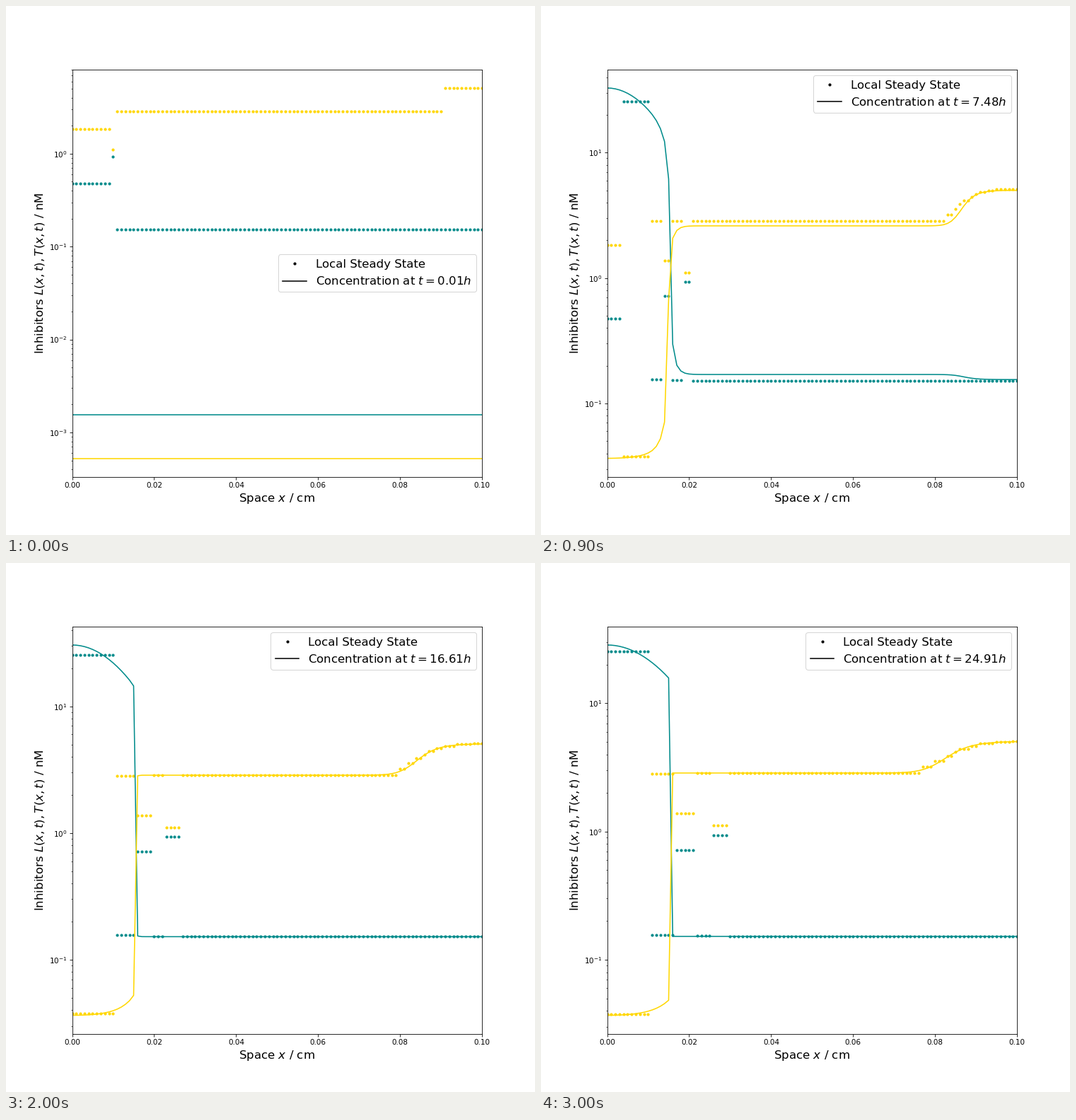
These frames come from a looping animation (748x748 px, 3.1 s). A matplotlib script:

```python
import numpy as np
import matplotlib.pyplot as plt
from matplotlib.animation import FuncAnimation
from matplotlib.lines import Line2D

FRAMES, INTERVAL = 31, 100
HOURS = .83
TEAL, GOLD = "darkcyan", "gold"
CELL = np.arange(101)
SPACE = CELL / 1000

L_START, T_START = .00154, .000527
T_MID, T_RIGHT = 2.86, 5.09

# Local steady states of the zones on the left, in order of space.
L_ZONES = np.array([.474, 25.5, .156, .715, .153, .935, .152])
T_ZONES = np.array([1.83, .0377, 2.84, 1.38, 2.85, 1.11, T_MID])
ZONE_SPEED = np.array([1.45, 2.32, 3.13, 4.06])


def settle(rate, power, t):
    """Growth from 0 towards 1."""
    return 1 - np.exp(-rate * t ** power)


def pulse(height, decay, t):
    """Temporary excess that rises and dies away."""
    return height * t * t * np.exp(-decay * t)


def front_z(t):
    """Diffusion variable of the front on the right."""
    return (90.5 - CELL) / np.sqrt(t)


def front_rise(t):
    """Share of the right-hand level reached in each cell."""
    z = np.clip(front_z(max(.6 * t, t - 1.6)), -3, 20)
    return 1 / (1 + np.exp(-1.815 + 1.15 * z + .131 * z * z))


def blend(inner, outer, gap, rate, t):
    """Join both sides on a log scale with a front that sharpens in time."""
    centre = 15.5 - gap * np.exp(-rate * max(0, t - 4.16))
    d = CELL - centre
    steepness = max(0, .6 * (t - 4.8))
    w = 1 / (1 + np.exp(-d - steepness * np.tanh(2 * d)))
    return inner ** (1 - w) * outer ** w


def concentrations(t):
    age = t - .01
    rise = front_rise(t)
    x = np.minimum(CELL, 16) / 10
    l_full = 34.8 * np.exp(-.008 * t - (.45 - .0075 * t) * x ** 2)
    l_in = L_START + l_full * settle(.0765, 2.5, age)
    l_out = (L_START + .1505 * settle(1, 2, age)
             + pulse(1.15, 1.094, age) * (1 - .85 * rise))
    t_in = (T_START + (.034 + 54 / l_full ** 3) * settle(1, 2, age)
            + pulse(.135, 1.3, age))
    t_out = (T_START + T_MID * settle(.0718, 1.75, age) * (1 - rise)
             + T_RIGHT * settle(.211, 1.53, age) * rise)
    return blend(l_in, l_out, 1.25, .83, t), blend(t_in, t_out, 2.6, .42, t)


def steady_states(t):
    first = 9.5 - 1.65 * t ** .68
    second = 10 if t > .5 else first
    edges = [first, second, *(9.6 + ZONE_SPEED * np.sqrt(t))]
    zone = np.searchsorted(edges, CELL)

    # The front on the right climbs in nine discrete levels.
    k = np.arange(-4, 5)
    limits = .903 - .39 * k - .02 * k ** 2 - .01 * k ** 3
    level = (front_z(t)[:, None] <= limits).sum(axis=1)
    climb = (T_RIGHT - T_MID) * (1 - (1 - level / 9) ** 1.5)
    return L_ZONES[zone], T_ZONES[zone] + climb


fig, ax = plt.subplots(figsize=(10, 10), dpi=74.8)


def draw(step):
    t = round(.01 + HOURS * step, 2)
    ax.clear()
    for dots, color in zip(steady_states(t), (TEAL, GOLD)):
        ax.semilogy(SPACE, dots, ".", color=color)
    for line, color in zip(concentrations(t), (TEAL, GOLD)):
        ax.semilogy(SPACE, line, color=color)
    ax.set_xlim(0, .1)
    ax.set_xlabel("Space $x$ / cm", fontsize=16)
    ax.set_ylabel("Inhibitors $L(x,t), T(x,t)$ / nM", fontsize=16)
    handles = [
        Line2D([], [], color="k", marker=".", ls="", label="Local Steady State"),
        Line2D([], [], color="k", label=f"Concentration at $t={t}h$"),
    ]
    ax.legend(handles=handles, loc="best", fontsize=16)


anim = FuncAnimation(fig, draw, frames=FRAMES, interval=INTERVAL, repeat=True)
plt.show()
```
